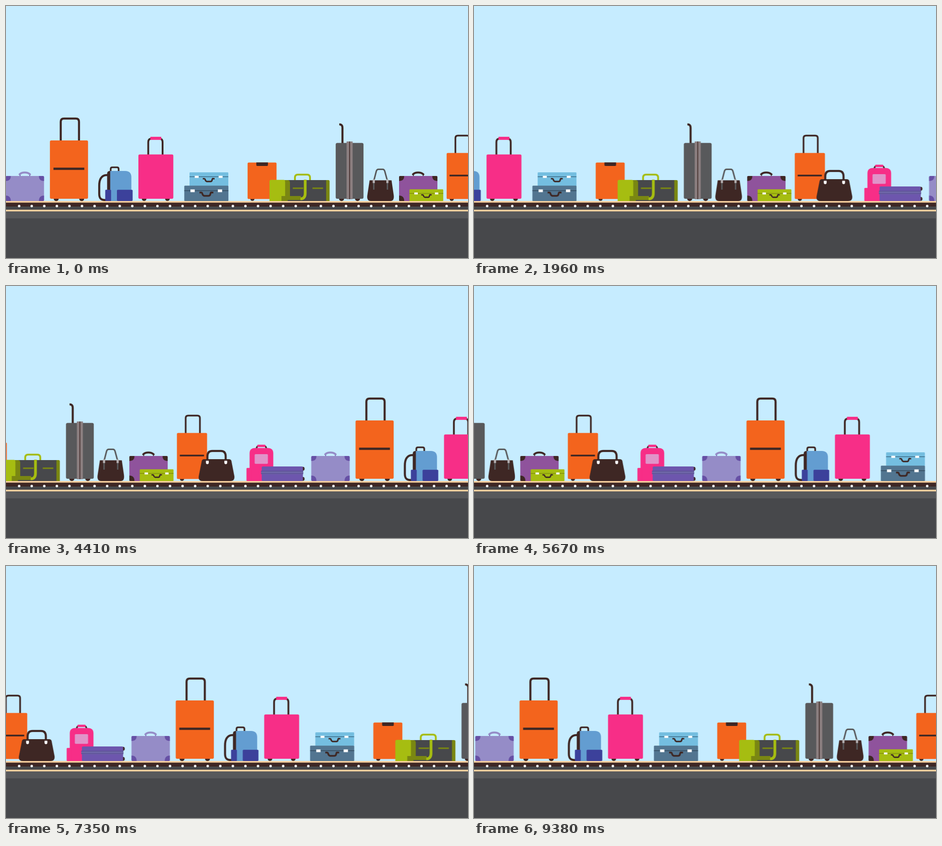
Recreate the animation shown at these times as an HTML page without scripts. Size 1012 by 553 pixels, loop 9.45 s.

```html
<!DOCTYPE html>
<html lang="en">
<head>
<meta charset="utf-8">
<title>Baggage belt</title>
<style>
  html, body { margin: 0; width: 100%; height: 100%; overflow: hidden; background: #c6ecff; }
  svg { display: block; width: 1012px; height: 553px; }
  .ride { animation: ride 9.45s steps(135) infinite; }
  @keyframes ride { to { transform: translateX(-1266.08px); } }
  .dark { fill: #3e2724; }
  .orange { fill: #f3641d; }
  .pink { fill: #f72e87; }
  .lime { fill: #a6bd11; }
  .olive { fill: #7a8712; }
  .coal { fill: #47484b; }
  .steel { fill: #58595b; }
  .navy { fill: #3c419b; }
  .white { fill: #fff; }
  .line { fill: none; stroke: #3e2724; stroke-width: 4.5; }
</style>
</head>
<body>
<svg viewBox="0 0 1012 553">
  <defs>
    <!-- case with corner guards: fill = body, color = guards -->
    <g id="case">
      <path d="M30.8 367V374M52 367V374" fill="none" stroke="currentColor" stroke-width="1.8"/>
      <rect x="-.7" y="373" width="84" height="55" rx="2.5"/>
      <g fill="currentColor">
        <path d="M-.7 384V375.5Q-.7 373 1.8 373H10.5Q10.5 384-.7 384Z"/>
        <path d="M83.3 384V375.5Q83.3 373 80.8 373H72.1Q72.1 384 83.3 384Z"/>
        <path d="M-.7 416V425.5Q-.7 428 1.8 428H10.5Q10.5 416-.7 416Z"/>
        <path d="M83.3 416V425.5Q83.3 428 80.8 428H72.1Q72.1 416 83.3 416Z"/>
      </g>
    </g>
    <path id="arch" d="M29.7 369.3Q34 365.4 41 365.4T52.6 369.3" fill="none" stroke-width="4.2" stroke-linecap="round"/>
    <!-- drop handle centred on 0,0 -->
    <path id="grip" class="line" d="M-13 0H-10Q-8 0-7.5 2.5T-4 6.2H4Q7 6.2 7.5 2.5T10 0H13" style="stroke-width:3.2"/>

    <g id="bags">
      <g fill="#958cc7" color="#6650a5">
        <use href="#case"/><use href="#arch" stroke="#958cc7"/>
      </g>

      <!-- tall trolley -->
      <path class="line" d="M119.9 296V254Q119.9 247 126.9 247H152.9Q159.9 247 159.9 254V296"/>
      <g class="dark"><circle cx="110" cy="422.5" r="5.5"/><circle cx="165.8" cy="422.5" r="5.5"/></g>
      <rect class="orange" x="96.2" y="295" width="83.5" height="128" rx="3"/>
      <rect class="dark" x="104" y="354.7" width="67.5" height="5"/>

      <!-- blue backpack -->
      <path class="line" d="M227 371H221C208 371 204.2 382 204.2 394V412C204.2 422 208 425.7 216 425.7H225"/>
      <path class="line" d="M229.3 364V357.5Q229.3 354 233 354H243Q246.7 354 246.7 357.5V364" style="stroke-width:3.6"/>
      <path class="dark" d="M221.5 404V368Q221.5 362 227.5 362H232V404Z"/>
      <path fill="#639dd1" d="M228.3 428V362H261Q274.6 362 274.6 376V428Z"/>
      <rect class="navy" x="217.4" y="403.3" width="12.8" height="24.7" rx="1.5"/>
      <rect class="navy" x="243" y="403.3" width="34.4" height="24.7" rx="2"/>

      <!-- pink trolley -->
      <path class="line" d="M311.6 327V299Q311.6 291 318.6 291H336Q343 291 343 299V327" style="stroke-width:4"/>
      <rect class="pink" x="316.2" y="287" width="24" height="6.8" rx="1"/>
      <g class="dark"><circle cx="302.6" cy="422.6" r="5.2"/><circle cx="353.6" cy="422.6" r="5.2"/></g>
      <rect class="pink" x="290" y="325.8" width="76.5" height="97.2" rx="3"/>

      <!-- stacked blue cases -->
      <rect fill="#74bee0" x="402" y="365" width="85" height="30" rx="1.5"/>
      <path d="M402 374.6H487" stroke="#315a75" stroke-width="1.2"/>
      <path class="white" d="M413.4 372.4h8.6v4.8h-8.6zM465.8 372.4h8.6v4.8h-8.6z"/>
      <use href="#grip" x="444" y="379"/>
      <rect fill="#527590" x="390.5" y="394.3" width="96.7" height="33.7" rx="1.5"/>
      <path d="M390.5 405.4H487.2" stroke="#2e4355" stroke-width="1.2"/>
      <path class="white" d="M404 402.6h9.4v5.8h-9.4zM464 402.6h9.4v5.8h-9.4z"/>
      <use href="#grip" transform="translate(439 409.4)scale(1.17)"/>

      <!-- small orange case -->
      <circle class="dark" cx="539.7" cy="423" r="4.6"/>
      <rect class="orange" x="529.2" y="343.4" width="63.4" height="80.2" rx="2.5"/>
      <path class="dark" d="M548.3 343.2H573.8V349Q573.8 351 571.8 351H550.3Q548.3 351 548.3 349Z"/>

      <!-- duffel -->
      <path class="line" d="M632.9 383V376.5Q632.9 370 639.4 370H659.4Q665.9 370 665.9 376.5V383" style="stroke:#a6bd11;stroke-width:4"/>
      <rect class="coal" x="615" y="382" width="90" height="46"/>
      <path class="olive" d="M701.3 382H706Q708.8 382 708.8 385V428H701.3Z"/>
      <path class="olive" d="M608 382H617Q622 382 622 388V418H608Z"/>
      <path class="lime" d="M577.2 428V385Q577.2 381.5 581 381.5H608Q611.4 381.5 611.4 386V428Z"/>
      <path class="olive" d="M603.4 417H646V425.8H617V428H603.4Z"/>
      <path class="olive" d="M628.2 398.2h23v3.4h-23zM671.3 398.2h23.2v3.4h-23.2z"/>
      <path class="line" d="M655.4 381V411Q655.4 423 645 423.3" style="stroke:#a6bd11;stroke-width:6"/>

      <!-- grey trolley -->
      <path class="line" d="M730 259.7Q737 259.7 737 267V302"/>
      <g class="dark"><circle cx="735" cy="422.4" r="5.6"/><circle cx="770" cy="422.4" r="5.6"/></g>
      <rect class="steel" x="722.2" y="300.5" width="60.9" height="122.5" rx="3.5"/>
      <rect fill="#8b7f80" x="746" y="297.3" width="13.3" height="126.7"/>
      <rect class="dark" x="751.8" y="297.3" width="1.7" height="126.7"/>

      <!-- handbag -->
      <path class="dark" d="M796.5 382.6H844.5L849.4 416Q850.5 428 842 428H799Q790 428 791.4 416Z"/>
      <path d="M805.6 403V384L811 363Q812.2 358.4 816 358.4H825Q828.6 358.4 829.8 363L835.5 384V403" fill="none" stroke="#58595b" stroke-width="3.2"/>
      <path fill="#b5b0b1" d="M803.2 380.5h4.8v8h-4.8zM833 380.5h4.8v8h-4.8z"/>

      <!-- purple and lime cases -->
      <g transform="translate(861.7)" fill="#8f539c" color="#3e2724">
        <use href="#case"/><use href="#arch" stroke="#3e2724"/>
      </g>
      <rect class="lime" x="883.8" y="402.2" width="74" height="25.8" rx="1.5"/>
      <path d="M883.8 411.3H957.8" stroke="#6d780f" stroke-width="1.1"/>
      <path class="white" d="M894.4 409.2h7.6v4.2h-7.6zM939.6 409.2h7.4v4.2h-7.4z"/>
      <use href="#grip" transform="translate(921 414.3)scale(.88)"/>

      <!-- medium trolley -->
      <path class="line" d="M984.4 324V290Q984.4 284.4 990 284.4H1010Q1015.6 284.4 1015.6 290V324" style="stroke-width:3.7"/>
      <circle class="dark" cx="976.3" cy="423" r="4.7"/>
      <rect class="orange" x="965.2" y="322.5" width="66.1" height="101" rx="2.5"/>
      <rect class="dark" x="971.6" y="370.2" width="53" height="3.7"/>

      <g transform="translate(262.6)">
        <!-- doctor's bag -->
        <path class="dark" d="M762 380H816Q821 380 822 384L828.4 417Q830 428 820 428H759Q748.6 428 750.5 417L757 384Q758 380 762 380Z"/>
        <path class="line" d="M769.4 386V374Q769.4 362 780 362H799Q809.4 362 809.4 374V386"/>
        <path class="white" d="M766.2 383.6h6.2v4.2q0 3.1-3.1 3.1t-3.1-3.1zM806.5 383.6h6.2v4.2q0 3.1-3.1 3.1t-3.1-3.1z"/>

        <!-- pink backpack -->
        <path class="line" d="M877 357Q877.5 351 882 351H893Q898 351 898.6 357" style="stroke-width:3.4"/>
        <rect class="pink" x="878.6" y="348.3" width="18" height="5.2" rx="1.5"/>
        <path class="pink" d="M861.8 428V367Q861.8 355.4 874 355.4H901.5Q913.7 355.4 913.7 367V428Z"/>
        <rect class="pink" x="855" y="399.3" width="10" height="28.7" rx="1.5"/>
        <rect fill="#e094c9" x="872.9" y="369" width="29" height="21.3" rx="2"/>

        <!-- flat purple case -->
        <g class="dark"><rect x="973" y="396.8" width="9.2" height="8.6" rx="3.8"/><rect x="973" y="419" width="9.2" height="8.6" rx="3.8"/></g>
        <rect fill="#6d56ad" x="888.4" y="396" width="90.2" height="32" rx="2.5"/>
        <rect fill="#6d66a6" x="887" y="405.6" width="92.4" height="7.6" rx="1"/>
        <path d="M887 406.2H979M887 411.6H979" stroke="#584a93" stroke-width="1.2"/>
      </g>
    </g>
  </defs>

  <rect width="1012" height="553" fill="#c6ecff"/>
  <g class="ride">
    <use href="#bags"/>
    <use href="#bags" x="1260.3"/>
  </g>

  <!-- belt -->
  <rect class="coal" y="428" width="1012" height="125"/>
  <rect class="steel" y="450" width="1012" height="16"/>
  <rect class="dark" y="431" width="1012" height="9"/>
  <path d="M0 429.8H1012M0 448.9H1012" stroke="#f6cf9d" stroke-width="3.6"/>
  <path d="M3.8 439h0M28.8 439H994" stroke="#f5f5f5" stroke-width="5.6" stroke-linecap="round" stroke-dasharray="0 27.54"/>
</svg>
</body>
</html>
```
